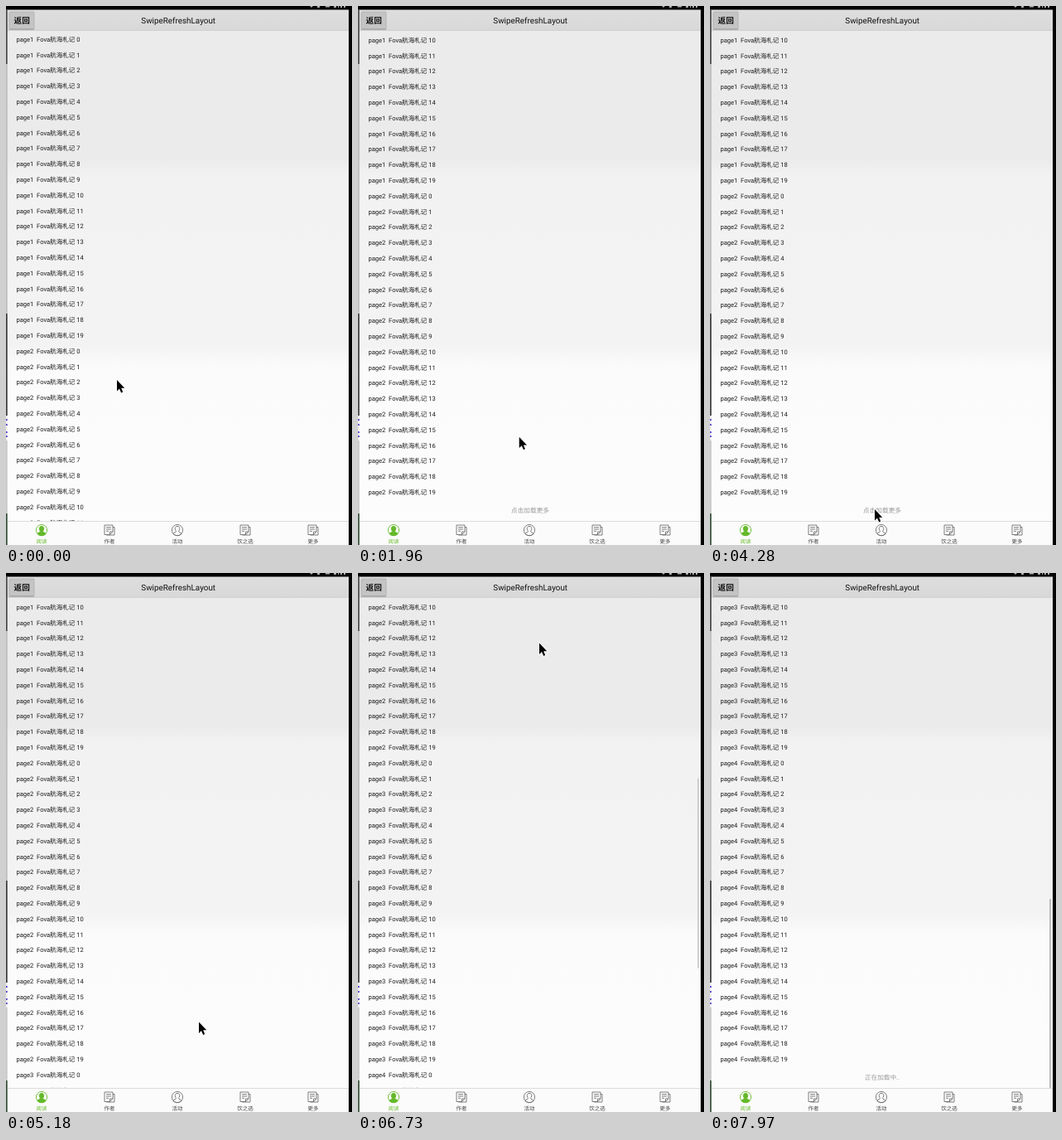
Animation, 418 px wide and 650 px high, one loop 8 s. Source, as an HTML page:

```html
<!DOCTYPE html>
<html lang="zh-CN">
<head>
<meta charset="utf-8">
<style>
  html, body { margin: 0; width: 100%; height: 100%; overflow: hidden; background: #fbfbfb; }
  svg { display: block; }
  text { font-family: Roboto, "Noto Sans CJK SC", "Noto Sans CJK", sans-serif; text-rendering: geometricPrecision; }
  #list text { font-size: 7.55px; fill: #1a1a1a; }
  #list #footer { font-size: 7.65px; fill: #9a9a9a; }
  .mid { text-anchor: middle; }
  .tab { font-size: 6.5px; fill: #444; }
  .icon { fill: none; stroke: #707070; stroke-width: .9; }
</style>
</head>
<body>
<svg width="418" height="650" viewBox="0 0 418 650">
  <defs>
    <linearGradient id="page" gradientUnits="userSpaceOnUse" x1="0" y1="30" x2="0" y2="622">
      <stop offset="0" stop-color="#ebebeb"/>
      <stop offset=".26" stop-color="#ebebeb"/>
      <stop offset=".295" stop-color="#f2f2f2"/>
      <stop offset=".64" stop-color="#f3f3f3"/>
      <stop offset=".685" stop-color="#fbfbfb"/>
      <stop offset="1" stop-color="#fcfcfc"/>
    </linearGradient>
    <linearGradient id="head" x1="0" y1="0" x2="0" y2="1">
      <stop offset="0" stop-color="#dedede"/>
      <stop offset="1" stop-color="#d8d8d8"/>
    </linearGradient>
    <path id="person" d="M0-4.6C2.1-4.6 2.9-3 2.7-1.2 2.5.2 1.8 1 1.5 1.5 1.6 2.8 4.4 2.6 5 4.7A7 7 0 0 1-5 4.7C-4.4 2.6-1.6 2.8-1.5 1.5-1.8 1-2.5.2-2.7-1.2-2.9-3-2.1-4.6 0-4.6Z"/>
    <path id="note" d="M-6-6H4V2L.5 5.5H-6ZM4-3.5H6V6H-3.5M.5 5.5V2H4M-4-3.3H2M-4-1H2M-4 1.3H-1"/>
  </defs>

  <rect y="30" width="418" height="592" fill="url(#page)"/>
  <g id="list"><text id="footer" class="mid" x="208"></text></g>
  <rect id="bar" x="410" width="2" fill="#bcbcbc"/>

  <rect y="4" width="418" height="26" fill="url(#head)"/>
  <path d="M2 29.5H414" stroke="#d0d0d0"/>
  <rect width="418" height="4.5"/>
  <path d="M367 0h4l-2 2zM376 0h3v2h-3zM386 0h5v1.5h-5zM396 0h3v2h-3zM401 0h1v2h-1zM404 0h2v2h-2zM408 0h2v2h-2z" fill="#aaa"/>
  <rect x="4" y="7" width="30" height="21" rx="1" fill="#c4c4c4" stroke="#b0b0b0" stroke-width=".8"/>
  <path d="M4 28H34" stroke="#989898"/>
  <text class="mid" x="19.2" y="21.2" font-size="9.6" font-weight="bold" fill="#111">返回</text>
  <text class="mid" x="208.2" y="21.2" font-size="9.9" fill="#111">SwipeRefreshLayout</text>

  <rect y="622" width="418" height="28" fill="#fbfbfb"/>
  <path d="M2 621.5H414" stroke="#dcdcdc"/>
  <g id="tabs"></g>

  <rect x="414" width="4" height="650"/>
  <g id="edge"></g>
  <path id="cursor" d="M0 0V13.4L3 10.6 5.2 15.4 7.2 14.5 5.2 9.8H9.3Z" stroke="#fff" stroke-width="1.6" paint-order="stroke"/>
</svg>
<script>
const LOOP = 8000, ROW = 18.8, TOP = 30, VIEW = 592;
const $ = id => document.getElementById(id);

function add(parent, tag, attrs, text = '') {
  const el = document.createElementNS('http://www.w3.org/2000/svg', tag);
  for (const k in attrs) el.setAttribute(k, attrs[k]);
  el.textContent = text;
  return parent.appendChild(el);
}

const rows = Array.from({ length: 80 }, (_, i) => add($('list'), 'text',
  { x: 12.5, y: 42.7 + i * ROW },
  `page${1 + Math.floor(i / 20)}\u00a0\u00a0Fova航海札记 ${i % 20}`));

['阅读', '作者', '活动', '饮之选', '更多'].forEach((name, i) => {
  const x = 43 + 82 * i, at = `translate(${x} 632)`;
  const person = i === 0 || i === 2, green = '#65b92b';
  const icon = add($('tabs'), 'g', { class: 'icon', transform: at });
  if (person) add(icon, 'circle', { r: 6.6 });
  const shape = add(icon, 'use', { href: person ? '#person' : '#note' });
  const label = add($('tabs'), 'text', { class: 'tab mid', x, y: 648 }, name);
  if (i === 0) {
    icon.style.stroke = shape.style.fill = label.style.fill = green;
  }
});

// Sliver of the desktop at the left: [top, bottom, colour]
[[4, 70, '#4a4a4a'], [70, 371, '#bdbdbd'], [371, 494, '#3c3c3c'], [494, 524, '#eee'],
 [498, 500, '#5a3fd0'], [504, 506, '#5a3fd0'], [513, 515, '#5a3fd0'], [518, 520, '#5a3fd0'],
 [524, 612, '#c8c8c8'], [612, 650, '#34503a']]
  .forEach(([y, end, fill]) => add($('edge'), 'rect', { y, width: 1.7, height: end - y, fill }));

// Stepped moves: [start, end, steps, ...destination]
const pointer = [
  [290, 380, 2, 128, 453],
  [620, 920, 6, 170.5, 419.5],
  [1550, 2260, 13, 215.5, 605.5],
  [3450, 3740, 6, 205, 609],
  [4220, 4280, 2, 199, 607],
  [4580, 5180, 11, 233, 541.5],
  [5240, 5300, 2, 215, 547],
  [5480, 5770, 6, 185, 553],
  [6070, 6340, 5, 219, 84.5],
  [6790, 7400, 11, 180, 561.5],
  [7550, 7730, 3, 215, 60]
];
const scrolls = [
  [1100, 1100, 1, 103.3],
  [1160, 1160, 1, 187],
  [6070, 6340, 5, 563],
  [7400, 7400, 1, 564.6],
  [7550, 7730, 3, 939]
];

function follow(pos, moves, t) {
  for (const [start, end, steps, ...to] of moves) {
    if (t < start) break;
    const done = t >= end ? 1 : (Math.floor((t - start) / (end - start) * (steps - 1)) + 1) / steps;
    pos = pos.map((v, i) => v + (to[i] - v) * done);
  }
  return pos;
}

function barOpacity(t) {
  const last = scrolls.filter(m => m[0] <= t).pop();
  if (!last) return 0;
  return Math.max(0, Math.min(1, 1 - (t - last[1] - 300) / 250));
}

function draw(now) {
  const t = now % LOOP;
  const [scroll] = follow([0], scrolls, t);
  const [x, y] = follow([134, 451], pointer, t);
  const count = t < 4880 ? 40 : t < 6730 ? 60 : 80;

  rows.forEach((row, i) => row.style.display = i < count ? '' : 'none');
  $('footer').textContent = t < 4580 ? '点击加载更多' : '正在加载中..';
  $('footer').setAttribute('y', 42.7 + (count - 1) * ROW + 22.2);
  $('list').setAttribute('transform', `translate(0 ${-scroll})`);

  const max = count * ROW + 27 - VIEW, size = VIEW * VIEW / (max + VIEW);
  $('bar').setAttribute('y', TOP + scroll / max * (VIEW - size));
  $('bar').setAttribute('height', size);
  $('bar').setAttribute('opacity', barOpacity(t));

  $('cursor').setAttribute('transform', `translate(${x} ${y})`);
  $('cursor').style.display = t < 7640 ? '' : 'none';
  requestAnimationFrame(draw);
}
requestAnimationFrame(draw);
</script>
</body>
</html>
```
